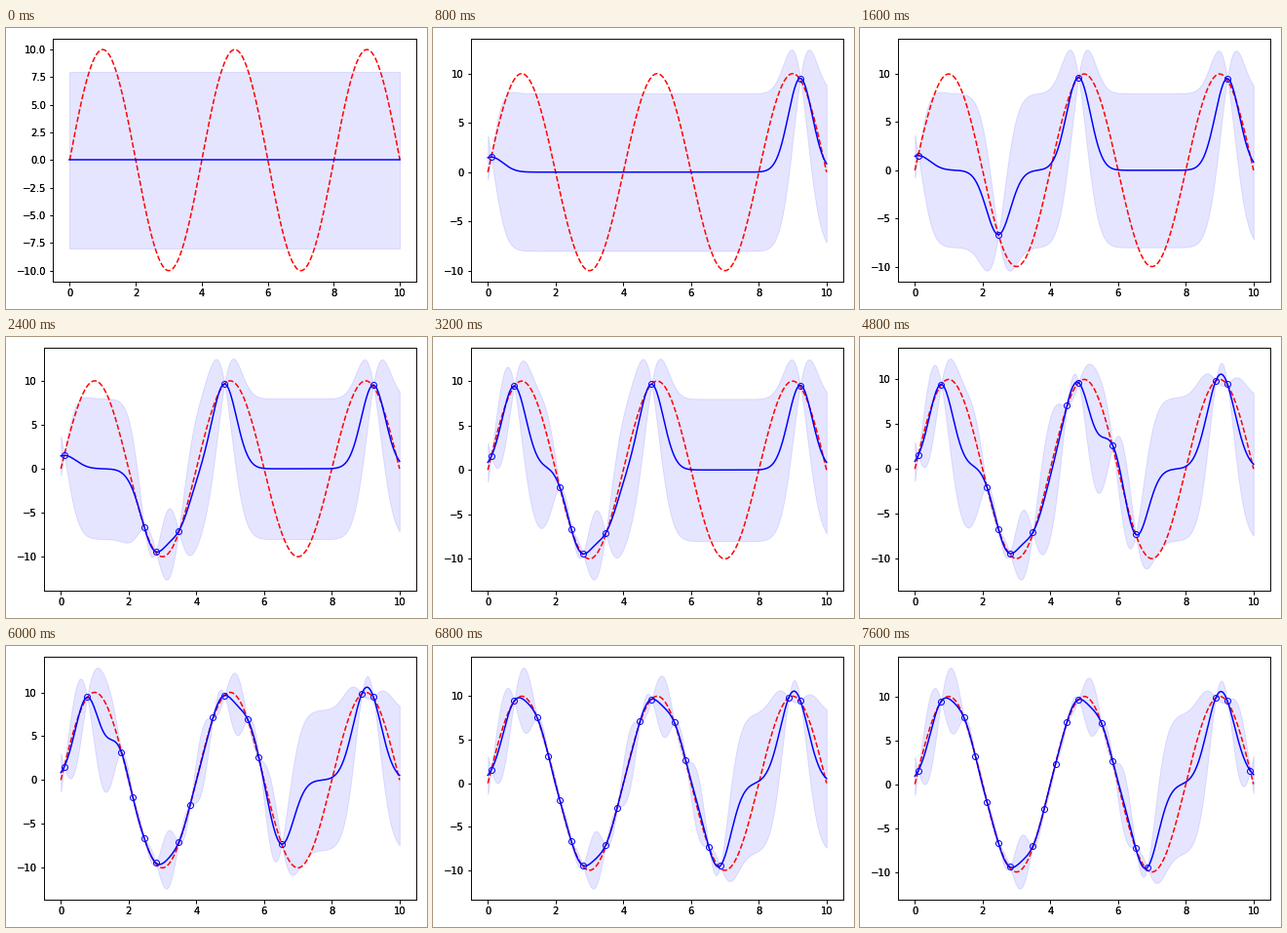
A matplotlib script that plays this animation: 432x288 px, repeating every 8 s.

```python
import numpy as np
import matplotlib.pyplot as plt
from matplotlib.animation import FuncAnimation

W, H, DPI = 432, 288, 72
SIGMA, SCALE = 4.0, 0.5

plt.rcParams["font.family"] = "DejaVu Sans"
plt.rcParams["font.size"] = 10


def signal(x):
    return 10 * np.sin(np.pi * x / 2)


def kernel(a, b):
    return SIGMA**2 * np.exp(-((a[:, None] - b[None, :]) / SCALE) ** 2)


def posterior(px, py, x):
    """Mean and standard deviation of the Gaussian process at x."""
    if len(px) == 0:
        return np.zeros_like(x), np.full_like(x, SIGMA)
    cross = kernel(px, x)
    solved = np.linalg.solve(kernel(px, px) + 1e-6 * np.eye(len(px)), cross)
    var = SIGMA**2 - np.sum(cross * solved, axis=0)
    return solved.T @ py, np.sqrt(np.maximum(var, 0))


# Observation order on an even grid, with small measurement errors.
order = [0, 27, 7, 14, 8, 10, 2, 6, 17, 19, 13, 26, 5, 16, 11, 20, 4, 12, 29]
errors = {27: 0.14, 2: 0.06, 17: 0.2, 10: 0.2, 20: 0.25, 8: 0.1,
          13: 0.13, 12: -0.08, 5: -0.1, 0: -0.04}
obs_x = np.linspace(0.1, 9.9, 30)[order]
obs_y = signal(obs_x) + np.array([errors.get(i, 0) for i in order])

xs = np.linspace(0, 10, 401)
truth = signal(xs)

fig = plt.figure(figsize=(W / DPI, H / DPI), dpi=DPI, facecolor="white")
ax = fig.add_subplot()
# A second transparent axes deepens the ticks and labels.
overlay = fig.add_axes(ax.get_position(), sharex=ax, sharey=ax)
overlay.patch.set_visible(False)

band = ax.fill_between(xs, -2 * SIGMA, 2 * SIGMA, color="b", alpha=0.1)
ax.plot(xs, truth, "r--", lw=1.5)
mean_line, = ax.plot(xs, 0 * xs, "b-", lw=1.5)
dots, = ax.plot([], [], "bo", mfc="none", ms=6)
ax.set_xlim(-0.5, 10.5)


def update(n):
    px, py = obs_x[:n], obs_y[:n]
    mean, std = posterior(px, py, xs)
    low, high = mean - 2 * std, mean + 2 * std
    outline = np.column_stack([np.r_[xs, xs[::-1]], np.r_[low, high[::-1]]])
    band.set_verts([outline])
    mean_line.set_ydata(mean)
    dots.set_data(px, py)

    bottom, top = min(low.min(), truth.min()), max(high.max(), truth.max())
    pad = 0.05 * (top - bottom)
    ax.set_ylim(bottom - pad, top + pad)

    # The left margin follows the width of the tick labels.
    left = 48.4 if n < 2 else 38.9
    box = [left / W, 28 / H, (421.2 - left) / W, (H - 38.8) / H]
    ax.set_position(box)
    overlay.set_position(box)
    return band, mean_line, dots


anim = FuncAnimation(fig, update, frames=len(order) + 1, interval=400,
                     repeat=True, repeat_delay=0, blit=False)
plt.show()
```
